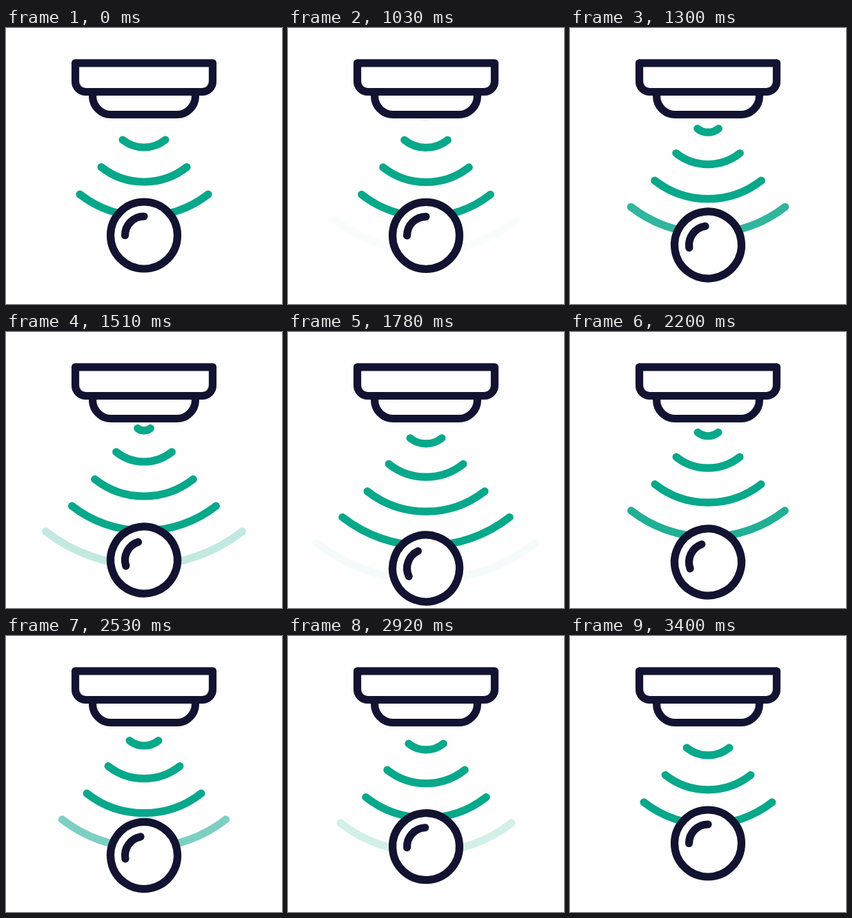
These frames come from a looping animation (400 px wide and 400 px high, 3430 ms). An HTML page:

```html
<!DOCTYPE html>
<html lang="en">
<head>
<meta charset="utf-8">
<title>Motion sensor</title>
<style>
  html, body { margin: 0; height: 100%; overflow: hidden; background: #fefefe; }
  svg { display: block; width: 100%; height: 100%; }
  path, circle { fill: none; stroke: #121331; stroke-width: 11.2; stroke-linecap: round; stroke-linejoin: round; }
  #waves path { stroke: #08a88a; }
  .solid { fill: #fefefe; }
</style>
</head>
<body>
<svg viewBox="0 0 400 400">
  <g id="waves"></g>
  <path class="solid" d="M125.5 92.5V98.5A27 27 0 0 0 152.5 125.5H247.5A27 27 0 0 0 274.5 98.5V92.5"/>
  <path class="solid" d="M100.5 50.8H299.5V77.5A15 15 0 0 1 284.5 92.5H115.5A15 15 0 0 1 100.5 77.5Z"/>
  <g id="ball">
    <circle class="solid" r="48.5"/>
    <path d="M0 -27.5A27.5 27.5 0 0 0 -27.5 0"/>
  </g>
</svg>
<script>
const LOOP = 3430, START = 990, PEAK = 1792, END = 3415, WAVES = 11;
// Stages of a wave: half width, y of the ends, y of the lowest point
const STAGES = [[0, 130, 130], [31, 162, 173], [62, 201.5, 223], [93, 241, 273], [131, 278, 323], [169, 315, 373]];
// How far past the third stage a wave stays visible: time, distance
const REACH = [[1000, 1], [1510, 1.55], [1620, 1.95], [1780, 1.775], [2200, 1.38], [2920, 0.98], [3160, 0.66], [LOOP, 0.66]];

const clamp = x => Math.min(1, Math.max(0, x));
const mix = (a, b, u) => a + (b - a) * u;
const smooth = x => x * x * (3 - 2 * x);
const progress = (t, from, to) => clamp((t - from) / (to - from));

// Cubic Bezier easing with control points (x1, 0) and (x2, 1)
function ease(x, x1, x2) {
  let lo = 0, hi = 1;
  for (let i = 0; i < 24; i++) {
    const s = (lo + hi) / 2, r = 1 - s;
    if (3 * s * r * (r * x1 + s * x2) + s ** 3 < x) lo = s; else hi = s;
  }
  return smooth(lo);
}

function reachAt(t) {
  const i = REACH.findIndex(([time]) => time >= t);
  if (i <= 0) return REACH[0][1];
  const [t0, a] = REACH[i - 1], [t1, b] = REACH[i];
  return mix(a, b, progress(t, t0, t1));
}

const ball = document.getElementById('ball');
const group = document.getElementById('waves');
const arcs = Array.from({ length: 5 }, () =>
  group.appendChild(document.createElementNS(group.namespaceURI, 'path')));

function draw(t) {
  const phase = WAVES * smooth(progress(t, START, END)) % 1;
  const reach = reachAt(t);
  arcs.forEach((arc, i) => {
    const [half, y, low] = STAGES[i].map((v, k) => mix(v, STAGES[i + 1][k], phase));
    const sag = Math.max(low - y, 0.01);
    const radius = (half * half + sag * sag) / (2 * sag);
    const past = i + phase - 3;
    const fadeOut = past <= 0 ? 1 : clamp((reach - past) / Math.min(1, reach));
    arc.setAttribute('d', `M${200 - half} ${y}A${radius} ${radius} 0 0 0 ${200 + half} ${y}`);
    arc.setAttribute('opacity', fadeOut * clamp((i + phase) / 0.15));
  });

  const drop = t < PEAK
    ? smooth(progress(t, START, PEAK))
    : 1 - ease(progress(t, PEAK, END), 0.333, 0.42);
  ball.setAttribute('transform', `translate(200 ${300.5 + 42 * drop}) rotate(${-25 * drop})`);
}

function tick() {
  const t = performance.now() % LOOP;
  draw(Math.floor((t - 10) / 30) * 30 + 10);
  requestAnimationFrame(tick);
}
tick();
</script>
</body>
</html>
```
